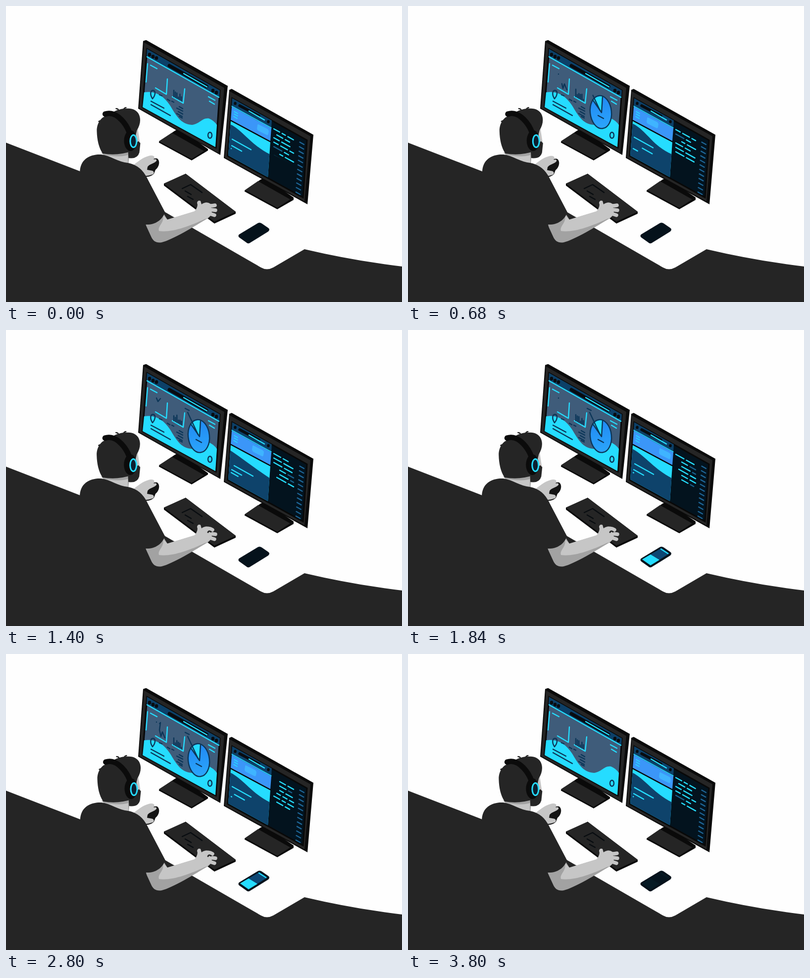
Recreate the animation shown at these times as an HTML page. Size 800x600 px, loop 3.84 s.

```html
<!DOCTYPE html>
<html lang="en">
<head>
<meta charset="utf-8">
<title>Working at two screens</title>
<style>
  html, body { margin: 0; width: 100%; height: 100%; overflow: hidden; background: #fefefe; }
  svg { display: block; width: 800px; height: 600px; }
  .line { fill: none; stroke-linecap: round; stroke-linejoin: round; }
  .cyan { stroke: #25dcff; }
  .navy { stroke: #0c3658; }
  .black { stroke: #080c10; }
  .dark { fill: #252525; }
  .edge { fill: #0a0a0a; }
</style>
</head>
<body>
<svg viewBox="0 0 800 600" stroke-width="2.4">
  <defs>
    <linearGradient id="pieFill" x2="0" y2="1"><stop stop-color="#2188f2"/><stop offset="1" stop-color="#2ba6fc"/></linearGradient>
    <clipPath id="codeArea"><path d="M536 243L586 271 583 324 536 299Z"/></clipPath>
    <clipPath id="pageArea"><path d="M454 233L534 276 529 347 449 303Z"/></clipPath>
  </defs>

  <!-- floor and desk edge -->
  <path class="dark" d="M0 277L152 336 290 390 320 417 515 530Q527 537 540 530L603 493Q700 516 800 528V600H0Z"/>

  <!-- left monitor -->
  <path class="edge" d="M309 275L341 253 350 248 408 290V293L375 313 309 277Z"/>
  <path class="dark" d="M309 274L335 257 400 294 375 310Z"/>
  <path class="edge" d="M277 71L283 69 448 162 433 302 267 208Z"/>
  <path class="dark" d="M279 74L441 166 429 298 269 207Z"/>
  <path fill="#3f5c7a" stroke="#080808" stroke-width="3" d="M285 87L432 171 424 287 276 205Z"/>
  <path fill="#0c4068" d="M285 87L432 171 431 186 284 103Z"/>
  <path fill="#25dcff" d="M279 175C300 171 318 181 331 201C343 220 352 240 376 241C392 239 396 226 410 228Q420 232 426 241L423 286 276 205Z"/>
  <g class="line">
    <path class="cyan" d="M285 103L430 185M286 117L283 154M292 120L305 127M326 148L324 179 302 166M361 168L358 197 336 184M409 184L422 191M411 193L421 199"/>
    <path class="black" stroke-width="7" d="M330 121L405 163"/>
    <path class="cyan" d="M359 137L406 164"/>
    <path class="black" stroke-width="6.500" d="M290 98v1M297 102v1M304 105v1M418 171v1M425 175v1"/>
    <path class="navy" d="M296 188C290 179 292 171 297 171C303 172 302 181 296 188ZM293 193L319 207M293 200L332 222M310 180L315 182M326 189L331 192M335 193L339 195M350 204L357 208M345 207L357 213M348 214L357 219M345 218L356 224M350 224L356 227"/>
    <ellipse class="navy" cx="412" cy="262" rx="4" ry="6"/>
    <path class="navy" id="bars"/>
    <path class="navy" id="spark" pathLength="100" d="M304 138L307 145 312 139 310 154 313 167 316 158 321 170"/>
  </g>
  <g id="pie">
    <ellipse cx="389.500" cy="215" rx="21.500" ry="33.500" fill="url(#pieFill)" transform="rotate(-6 389.500 215)"/>
    <path fill="#25dcff" d="M391 216L373 191Q380 182 393 183Z"/>
    <g class="line navy">
      <ellipse cx="389.500" cy="215" rx="21.500" ry="33.500" transform="rotate(-6 389.500 215)"/>
      <path d="M373 190L391 216 393 184M384 222L395 228"/>
    </g>
  </g>
  <path class="line navy" id="callout" pathLength="100" d="M388 212L367 167"/>
  <path class="line navy" id="label" d="M362 159L370 163"/>

  <!-- right monitor -->
  <path class="edge" d="M482 374L514 352 522 348 581 388V393L548 412 482 376Z"/>
  <path class="dark" d="M483 373L509 355 574 392 548 409Z"/>
  <path class="edge" d="M451 170L456 168 621 261 609 402 440 308Z"/>
  <path class="dark" d="M452 173L615 264 603 396 442 307Z"/>
  <path fill="#03131e" stroke="#080808" stroke-width="3" d="M457 187L608 272 600 388 448 304Z"/>
  <path fill="#0c4068" d="M457 187L537 232 536 247 456 203Z"/>
  <path fill="#3b96f8" d="M456 204L536 248 534 274 454 231Z"/>
  <g clip-path="url(#pageArea)">
    <path fill="#25dcff" d="M440 220H540V350H440Z"/>
    <path fill="#0e436b" id="hill"/>
  </g>
  <g class="line">
    <path class="cyan" stroke-width="1.500" d="M456 203L536 247"/>
    <path class="black" stroke-width="5.500" d="M463 197v1M472 202L511 223M530 234v1"/>
    <path class="cyan" d="M491 213L522 231"/>
    <path class="black" d="M454 232L534 275"/>
    <path class="cyan" stroke-width="1.800" d="M461 214L468 218M461 219L468 223M460 224L467 228"/>
    <path class="cyan" id="pageText"/>
  </g>
  <path id="button" fill="#3fb4ff" d="M-9 -11L9 -2Q12 0 12 3L11 9Q10 12 7 10L-9 2Q-12 0 -12 -3L-11 -9Q-11 -12 -9 -11Z"/>
  <g class="line" clip-path="url(#codeArea)"><g id="code"></g></g>
  <path class="line" id="margin" stroke="#1d6596"/>

  <!-- keyboard and phone -->
  <path class="edge" d="M319 360L363 340 464 417V421L421 441 319 364Z"/>
  <path class="dark" d="M319 360L363 340 464 417 421 437Z"/>
  <path class="line black" d="M356 370L373 362 396 378M362 375L374 382M367 386L378 392"/>
  <path fill="#05121b" d="M471 463L509 440Q513 438 517 441L530 450Q534 453 530 457L493 480Q489 483 485 479L471 469Q468 466 471 463Z"/>
  <g id="phone">
    <path fill="#0d4774" d="M473 465L512 442 528 453 490 477Z"/>
    <path fill="#25dcff" d="M473 465L490 455 508 466 490 477Z"/>
    <path class="line cyan" d="M511 444L525 453"/>
  </g>

  <!-- mouse and mouse hand -->
  <g id="mouse">
    <path fill="#141414" d="M283 330C287 314 298 307 305 309C312 313 310 326 302 332L299 340Q292 347 282 346Z"/>
    <path fill="#c6c6c6" d="M254 325C266 316 276 307 288 304Q294 302 298 304Q302 307 298 311Q305 309 304 314C300 319 290 320 286 326L285 332L296 334Q301 337 297 341C290 344 278 346 270 343L246 328Z"/>
    <path fill="#a2a2a2" d="M248 327Q266 327 274 344L258 342Z"/>
  </g>

  <!-- typing arm -->
  <path fill="#a2a2a2" d="M282 440L318 420 326 433 386 415 410 429C380 447 336 474 315 479Q299 482 293 467L282 443Z"/>
  <path fill="#c6c6c6" d="M317 423L326 433 381 416Q389 406 386 399Q387 393 393 395L395 402Q405 395 413 401L416 420Q412 430 401 432C370 447 333 460 309 456C306 445 321 440 317 423Z"/>
  <g class="line" stroke="#c6c6c6" stroke-width="7.500">
    <path d="M407 412L423 414M406 419L421 424"/>
    <path id="finger"/>
  </g>
  <path class="line" id="gap" stroke="#252525" stroke-width="3" d="M408 410Q410 406 414 409"/>

  <!-- body and head -->
  <g id="body">
    <path fill="#a2a2a2" d="M192 297L250 290 247 321Q222 315 198 303Z"/>
    <path fill="#c6c6c6" d="M196 301Q230 308 246 302V319Q220 320 196 303Z"/>
    <path class="dark" d="M149 338C149 310 170 300 192 301C210 303 228 317 246 318C268 322 279 336 287 353L321 418C315 435 300 444 282 443L300 520H100Z"/>
    <g id="head">
      <path fill="#c6c6c6" d="M258 242L266 250 270 276 260 292Z"/>
      <path class="dark" d="M195 299C186 286 183 268 183 250C184 239 188 232 195 226L218 214C230 207 250 206 258 210C273 217 274 236 264 252L254 294Q226 304 195 299Z"/>
      <path class="dark" d="M246 291L267 274 271 278 269 297Q265 311 247 308Z"/>
      <path class="line" stroke="#252525" d="M187 234Q190 231 196 235M227 213Q227 208 222 208M236 212Q238 206 242 206"/>
      <path class="line" stroke="#0b0b0b" stroke-width="11" d="M200 219C222 211 247 240 252 269"/>
      <ellipse cx="251" cy="273" rx="13" ry="21" fill="#0b0b0b"/>
      <ellipse class="cyan" cx="257" cy="274" rx="6.500" ry="12.500" fill="#0c2030" stroke-width="3"/>
    </g>
  </g>
</svg>
<script>
const LOOP = 3840, HALF = LOOP / 2, SLOPE = 0.56, ROWS = 16, GAP = 9;
const $ = id => document.getElementById(id);
const set = (id, name, value) => $(id).setAttribute(name, value);

const ramp = (t, from, to) => Math.min(1, Math.max(0, (t - from) / (to - from)));
const ease = (t, from, to) => { const p = ramp(t, from, to); return p * p * (3 - 2 * p); };
// Rises at one time and falls at another, each over the fade time.
const shown = (t, start, end, fade) => ease(t, start, start + fade) - ease(t, end, end + fade);
const slanted = (x, y, w) => `M${x} ${y}l${w} ${w * SLOPE}`;
const repeat = (n, make) => Array.from({ length: n }, (_, i) => make(i));

// Shows the part of a path between two percentages of its length.
function trim(id, from, to) {
  set(id, 'stroke-dasharray', `0 ${from} ${to - from} 300`);
  set(id, 'visibility', to > from ? 'visible' : 'hidden');
}

let seed = 11;
const random = () => (seed = seed * 16807 % 2147483647) / 2147483647;

function codeRow(_, row) {
  let words = '';
  for (let x = 541 + Math.floor(random() * 3) * 6; x < 575;) {
    const width = Math.min(6 + random() * 13, 581 - x);
    const color = random() < 0.22 ? '#17618d' : '#25dcff';
    words += `<path stroke="${color}" d="${slanted(x, 249 + (x - 541) * SLOPE, width)}"/>`;
    x += width + 5;
  }
  return words;
}

// The rows appear twice so that the scroll wraps.
const rows = repeat(ROWS, codeRow);
$('code').innerHTML = [...rows, ...rows]
  .map((row, i) => `<g transform="translate(0 ${i * GAP})">${row}</g>`).join('');
set('margin', 'd', repeat(12, i => slanted(593.5 - i * 0.7, 276 + i * 9.2, 8.5)).join(''));

function draw(now) {
  const t = now % LOOP, h = t % HALF, angle = h / HALF * 2 * Math.PI;

  // Person
  const sway = 1 + Math.cos(angle - 2.1);
  set('body', 'transform', `translate(${sway * 0.5} 0)`);
  set('head', 'transform', `translate(${sway * 0.4} 0)`);
  const reach = -4 * shown(t, 300, 900, 350);
  set('mouse', 'transform', `translate(${reach} ${-reach * 0.2})`);
  const curl = shown(t, 700, 3420, 360);
  set('finger', 'd', `M402 404Q${412 - curl * 2} ${406 - curl * 6} ${422 - curl * 5} ${404 + curl}`);
  set('gap', 'opacity', curl);

  // Charts
  trim('spark', 100 * (1 - ramp(h, 380, 1000)), 100 * (1 - ramp(h, 900, 1870)) ** 2);
  set('bars', 'd', repeat(6, i => {
    const height = 9 + (i % 2 ? 0 : 4) - i * 0.7 + Math.sin(angle + i * 1.7) * 3;
    return `M${339 + i * 3.1} ${184 + i * 1.6}v${-height}`;
  }).join(''));
  const pie = shown(t, 240, 3220, 340);
  set('pie', 'transform', `translate(390 215) scale(${pie}) translate(-390 -215)`);
  trim('callout', 0, 100 * shown(t, 480, 2900, 320));
  set('label', 'opacity', shown(t, 840, 2860, 120));
  set('phone', 'opacity', shown(t, 1480, 3520, 320));

  // Web page and code
  const slide = -25 * shown(h, 180, 1220, 320);
  set('button', 'transform', `translate(${519 + slide} ${251 + slide * SLOPE})`);
  const bend = 0.5 + 0.5 * Math.cos(angle - 1.4);
  set('hill', 'd', `M450 ${242 - bend * 6}C${475 + bend * 5} ${258 - bend * 13} ${500 - bend * 10} ${279 + bend * 5} 534 301V350H440Z`);
  const wave = Math.sin(angle), shift = 22 * Math.max(0, wave);
  set('pageText', 'd', slanted(457 + Math.max(0, -wave) * 4, 270 - wave * 5, 38) +
    slanted(456 + shift, 283 + shift * 0.3, 20) + slanted(455, 289, 14 * wave * wave));
  set('code', 'transform', `translate(0 ${-t / LOOP * ROWS * GAP})`);
}

function frame() {
  draw(performance.now());
  requestAnimationFrame(frame);
}
frame();
</script>
</body>
</html>
```
